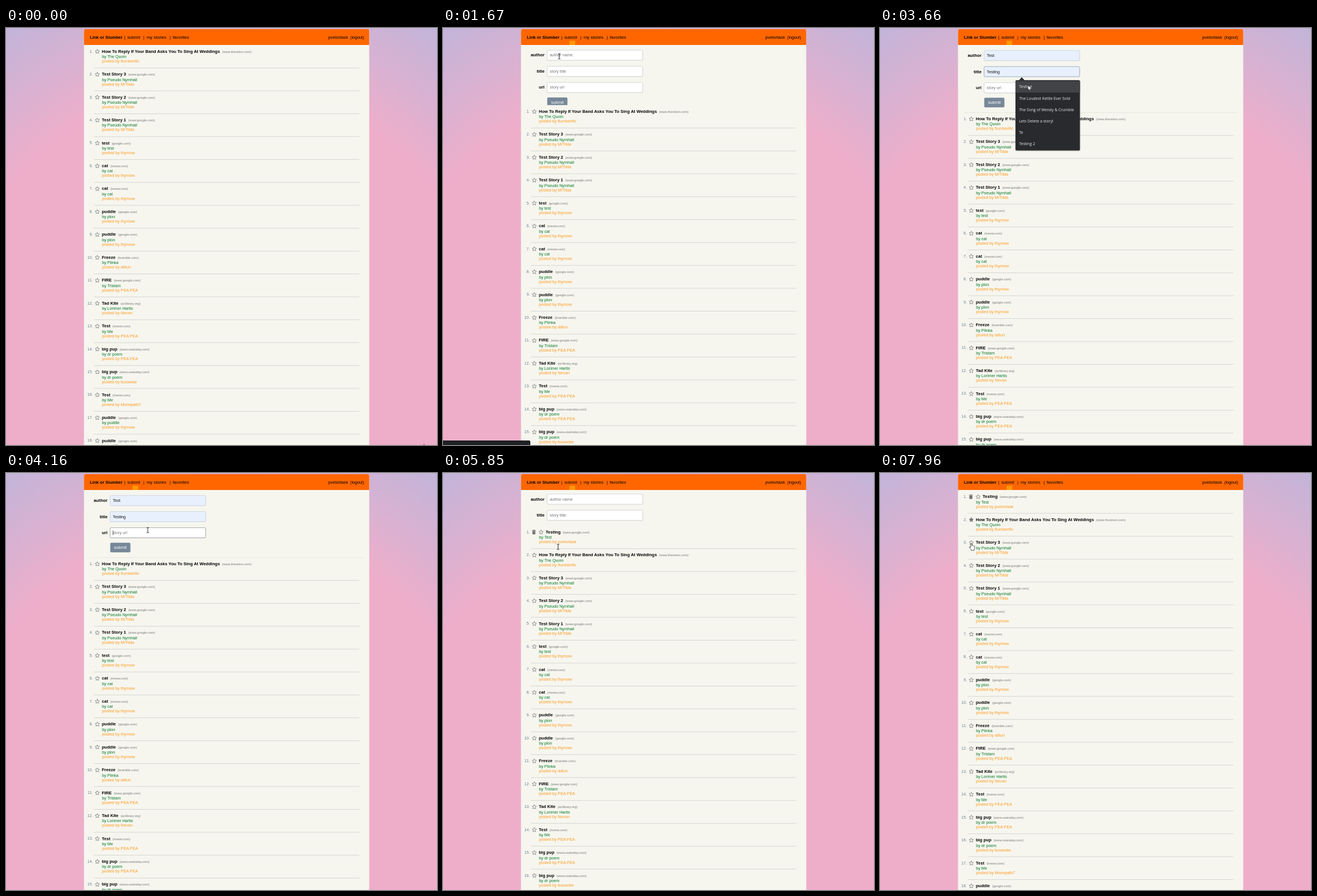
An HTML page that plays this animation: 760 by 737 pixels, repeating every 8000 ms.

```html
<!DOCTYPE html>
<html lang="en">
<head>
<meta charset="utf-8">
<title>Story list</title>
<style>
html, body { margin: 0; width: 100%; height: 100%; overflow: hidden; }
svg { display: block; width: 760px; height: 737px; font: 7.2px "Liberation Sans", Arial, sans-serif; }
.bold { font-weight: bold; font-size: 7.55px; }
.label { font-weight: bold; font-size: 7.8px; text-anchor: end; }
.nav { font-size: 7.65px; }
.host { font-weight: normal; font-size: 5.73px; fill: #777; }
.num { fill: slategray; text-anchor: end; }
.by { fill: #04782a; }
.user { fill: #ff9a1f; }
.menu { font: 6.8px "Open Sans", "Noto Sans", sans-serif; fill: #e8eaed; }
.star { stroke: #777; stroke-width: .8; stroke-linejoin: round; }
</style>
</head>
<body>
<svg id="stage" viewBox="0 0 760 737">
  <defs>
    <radialGradient id="sky" gradientUnits="userSpaceOnUse" cx="380" cy="565" r="900">
      <stop offset=".52" stop-color="#eeaeca"/>
      <stop offset="1" stop-color="#94bbe9"/>
    </radialGradient>
    <clipPath id="formClip"><rect id="formWindow" x="137" y="30" width="504" height="0"/></clipPath>
  </defs>
  <rect width="760" height="737" fill="url(#sky)"/>
  <path d="M137.5 737V5q0-3 3-3h497q3 0 3 3V737z" fill="#f6f6ef"/>
  <path d="M137.5 30V5q0-3 3-3h497q3 0 3 3V30z" fill="#f60"/>
</svg>
<script>
const LOOP = 8000, PITCH = 40.46, FORM_H = 119.3;
const stage = document.getElementById('stage');
const formWindow = document.getElementById('formWindow');

function el(tag, attrs, parent = stage, text) {
  const node = document.createElementNS('http://www.w3.org/2000/svg', tag);
  for (const k in attrs) node.setAttribute(k, attrs[k]);
  if (text !== undefined) node.textContent = text;
  parent.appendChild(node);
  return node;
}
const label = (parent, x, y, text, cls) => el('text', { x, y, class: cls || '' }, parent, text);
const show = (node, on) => node.setAttribute('display', on ? 'inline' : 'none');
const clamp = v => Math.max(0, Math.min(1, v));
const ramp = (t, a, b) => clamp((t - a) / (b - a));
const swing = p => (1 - Math.cos(p * Math.PI)) / 2;

// Header
label(stage, 148, 19, 'Link or Slumber', 'bold');
[[208.3, '|'], [214, 'submit'], [242, '|'], [248, 'my stories'], [288.5, '|'], [294, 'favorites']]
  .forEach(([x, s]) => label(stage, x, 19, s, 'nav'));
label(stage, 603, 19, 'pvelortask', 'nav').setAttribute('text-anchor', 'end');
label(stage, 607, 19, '(logout)');
const trail = el('g', {});
el('rect', { x: 223, y: 22.5, width: 10, height: 7.5, fill: '#ff9800' }, trail);
el('path', { d: 'M239.6 20v7', stroke: '#e05a00', 'stroke-width': .8 }, trail);

// Story list: title, host, author, poster
const stories = [
  ['Testing', 'www.google.com', 'Test', 'pvelortask'],
  ['How To Reply If Your Band Asks You To Sing At Weddings', 'www.theonion.com', 'The Quoin', 'flumberific'],
  ...[3, 2, 1].map(n => ['Test Story ' + n, 'www.google.com', 'Pseudo Nymhall', 'MrTilda']),
  ['test', 'google.com', 'test', 'thymow'],
  ['cat', 'meow.com', 'cat', 'thymow'],
  ['cat', 'meow.com', 'cat', 'thymow'],
  ['puddle', 'google.com', 'plon', 'thymow'],
  ['puddle', 'google.com', 'plon', 'thymow'],
  ['Freeze', 'bramble.com', 'Plinka', 'ddlun'],
  ['FIRE', 'www.google.com', 'Tristam', 'PEA PEA'],
  ['Tad Kite', 'aclibrary.org', 'Lorimer Hartis', 'Nevan'],
  ['Test', 'meow.com', 'Me', 'PEA PEA'],
  ['big pup', 'www.usatoday.com', 'dr poem', 'PEA PEA'],
  ['big pup', 'www.usatoday.com', 'dr poem', 'buswoke'],
  ['Test', 'meow.com', 'Me', 'Moonpath7'],
  ['puddle', 'google.com', 'puddle', 'thymow'],
  ['puddle', 'google.com', 'puddle', 'thymow']
];

function starPath(cx, cy, r) {
  let d = '';
  for (let i = 0; i < 10; i++) {
    const a = i * Math.PI / 5, q = i % 2 ? r * .48 : r;
    d += (i ? 'L' : 'M') + (cx + q * Math.sin(a)).toFixed(2) + ' ' + (cy - q * Math.cos(a)).toFixed(2);
  }
  return d + 'z';
}

const list = el('g', {});
const rows = stories.map(([title, host, author, user], i) => {
  const g = el('g', {}, list), own = i === 0;
  const num = label(g, 153.2, 43.6, '', 'num');
  if (own) el('path', { d: 'M157 38h2l.5-.8h1.6l.5.8h2v1h-6.6zM157.4 39.5h5.7l-.4 6h-4.9z', fill: '#777' }, g);
  const star = el('path', { d: starPath(own ? 173 : 161, 41.6, 4), class: 'star', fill: 'none' }, g);
  const head = label(g, own ? 181 : 169, 43.7, title, 'bold');
  el('tspan', { class: 'host', dx: 4 }, head, `(${host})`);
  label(g, 169.2, 53.1, 'by ' + author, 'by');
  label(g, 169.2, 61.1, 'posted by ' + user, 'user');
  el('path', { d: 'M155 70.6H623', stroke: '#d3d3d0', 'stroke-width': .9 }, g);
  return { g, num, star };
});

// Form
const form = el('g', { 'clip-path': 'url(#formClip)' });
const inner = el('g', {}, form);
const fields = [['author', 'author name'], ['title', 'story title'], ['url', 'story url']].map(([name, hint], i) => {
  const y = 48.6 + i * 28.5;
  label(inner, 179, y + 2.4, name, 'label');
  el('rect', { x: 182.8, y: y - 9.3, width: 170, height: 19.2, rx: 2.5, fill: '#e4e4df' }, inner);
  const box = el('rect', { x: 183.6, y: y - 8.9, width: 168.4, height: 17.8, rx: 2, 'stroke-width': .8 }, inner);
  const text = label(inner, 188.3, y + 2.4, '');
  const caret = el('rect', { y: y - 4.3, width: .7, height: 8.4, fill: '#111' }, inner);
  return { hint, box, text, caret };
});
const button = el('rect', { x: 183.8, y: 123.2, width: 35.6, height: 17, rx: 2 }, inner);
el('text', { x: 201.6, y: 134.3, 'text-anchor': 'middle', fill: '#fff', 'font-size': 7.6 }, inner, 'submit');
el('path', { d: 'M148 149.5H630.5', stroke: '#bdbdb9', 'stroke-width': 1 }, inner);

// The field has focus from `start` to `end`; its caret blinks from `start` on.
function setField(f, t, value, filled, start, end) {
  const focused = t >= start && t < end;
  f.box.setAttribute('fill', filled ? '#e8f0fe' : '#fff');
  f.box.setAttribute('stroke', focused ? (filled ? '#93a3b8' : '#989898') : (filled ? '#cdd5e0' : '#d2d2d2'));
  f.text.textContent = value || f.hint;
  f.text.setAttribute('fill', value ? '#111' : '#757575');
  show(f.caret, focused && (t - start) % 1000 < 500);
  if (focused) f.caret.setAttribute('x', 188.5 + (value ? f.text.getComputedTextLength() : 0));
}

// Suggestion menus
function makeMenu(top, width, items) {
  const g = el('g', {});
  const h = items.length * 20.1 + 3.6;
  el('rect', { x: 238, y: top, width: width + 2, height: h + 1.5, rx: 3, fill: '#000', opacity: .15 }, g);
  el('path', { d: `M245 ${top + .3}l5-5.5 5 5.5z`, fill: '#292a2d' }, g);
  el('rect', { x: 239, y: top, width, height: h, rx: 2, fill: '#292a2d' }, g);
  const lit = el('rect', { x: 239, y: top + 1.8, width, height: 20.1, fill: '#424346' }, g);
  items.forEach((s, i) => label(g, 245.3, top + 14.2 + i * 20.1, s, 'menu'));
  return { g, lit };
}
const authorMenu = makeMenu(64, 86.5, ['Test', 'Test 2']);
const titleMenu = makeMenu(92.2, 113.5, ['Testing', 'The Loudest Kettle Ever Sold',
  'The Song of Wendy & Crumble', 'Lets Delete a story!', 'Te', 'Testing 2']);

function setMenu(menu, opacity, lit) {
  show(menu.g, opacity > 0);
  menu.g.setAttribute('opacity', opacity);
  show(menu.lit, lit);
}

const statusBar = el('path', { d: 'M0 737V729H151.5q2.5 0 2.5 2.5V737z', fill: '#202124' });

// Pointers, each with its hot spot at 0,0
const pointers = {
  arrow: el('path', { d: 'M0 0V9l2.1-1.9 1.4 3.1 1.5-.7-1.4-3H6.5z', fill: '#fff', stroke: '#111', 'stroke-width': .7 }),
  beam: el('path', { d: 'M-2-4.5H-.6L0-4 .6-4.5H2M0-4V4M-2 4.5H-.6L0 4 .6 4.5H2', fill: 'none', stroke: '#111', 'stroke-width': .9 }),
  hand: el('path', {
    d: 'M-1 1q1-1.7 2 0V4.5q1-.8 1.8.2 1-.7 1.7.3 1.2-.3 1.4.9V8.5L5 11.5V12.8H-.2V11.5L-3.6 7.5q-.2-1.5 1.3-1L-1 7.7z',
    fill: '#fff', stroke: '#222', 'stroke-width': .75, 'stroke-linejoin': 'round'
  })
};
const path = [
  [0, 737, 735.6, 'arrow'], [30, 640, 590, 'arrow'], [90, 450, 310, 'arrow'], [150, 269, 37, 'arrow'],
  [200, 242, -20, ''], [410, 242, -12, 'arrow'], [560, 238, 8, 'hand'], [880, 228, 18, 'hand'],
  [1190, 228, 18, 'hand'], [1400, 216, 36, 'beam'], [1670, 205, 50, 'beam'], [2030, 205, 50, 'beam'],
  [2210, 215, 55, 'beam'], [2420, 248, 72, 'arrow'], [2850, 265, 80, 'arrow'], [3010, 262, 80, 'beam'],
  [3210, 260, 81, 'beam'], [3390, 260, 83, 'beam'], [3480, 261, 95, 'arrow'], [3660, 261, 101, 'arrow'],
  [3950, 259, 101, 'beam'], [4160, 250, 101, 'beam'], [4600, 250, 101, 'beam'], [4950, 222, 118, 'arrow'],
  [5050, 212, 127, 'hand'], [5260, 202, 132, 'hand'], [5620, 203, 131, 'beam'], [6140, 203, 130, 'beam'],
  [6430, 167, 93, 'beam'], [6640, 167, 93, 'beam'], [6770, 164, 89, 'arrow'], [7030, 164, 89, 'arrow'],
  [7080, 160, 86, 'hand'], [7230, 160, 86, 'hand'], [7250, 160, 80, 'hand'], [7390, 160, 80, 'hand'],
  [7580, 161, 126, 'hand'], [7760, 161, 126, 'hand'], [7960, 161, 124, 'hand'], [8000, 161, 124, 'hand']
];

function movePointer(t) {
  let i = 0;
  while (i < path.length - 2 && path[i + 1][0] <= t) i++;
  const [a, x, y, kind] = path[i], [b, u, v] = path[i + 1];
  // The first sweep starts after a short rest.
  const p = i ? ramp(t, a, b) : 0;
  for (const k in pointers) show(pointers[k], k === kind);
  if (kind) pointers[kind].setAttribute('transform', `translate(${x + (u - x) * p} ${y + (v - y) * p})`);
}

function draw(t) {
  const added = t >= 5560;
  const open = swing(ramp(t, 1200, 1800)) - swing(ramp(t, 5560, 6160));
  const drop = FORM_H * open;

  list.setAttribute('transform', `translate(0 ${drop})`);
  rows.forEach(({ g, num, star }, i) => {
    const place = added ? i : i - 1;
    show(g, place >= 0);
    g.setAttribute('transform', `translate(0 ${place * PITCH + (added ? .6 : 0)})`);
    num.textContent = place + 1 + '.';
    star.setAttribute('fill', i === 1 && t >= 7390 ? '#777' : 'none');
  });

  show(form, drop > .1);
  formWindow.setAttribute('height', drop);
  inner.setAttribute('transform', `translate(0 ${(open - 1) * 5})`);
  const hasAuthor = t >= 2420 && !added, hasTitle = t >= 3480 && !added, hasUrl = t >= 4550 && !added;
  setField(fields[0], t, hasAuthor ? 'Test' : '', hasAuthor, 1840, 3110);
  setField(fields[1], t, hasTitle ? 'Testing' : '', hasTitle, 3110, 4100);
  setField(fields[2], t, hasUrl ? 'https://www.google.com' : '', false, 4100, 5560);
  button.setAttribute('fill', t >= 5050 && t < 5600 ? '#696969' : '#778899');

  setMenu(authorMenu, t < 2030 ? 0 : 1 - ramp(t, 2800, 3000), t >= 2420);
  setMenu(titleMenu, ramp(t, 3110, 3210) * (1 - ramp(t, 3860, 4060)), t >= 3480);
  show(statusBar, t >= 1190 && t < 2030);
  show(trail, t >= 1190);
  movePointer(t);
}

function tick() {
  draw(performance.now() % LOOP);
  requestAnimationFrame(tick);
}
tick();
</script>
</body>
</html>
```
